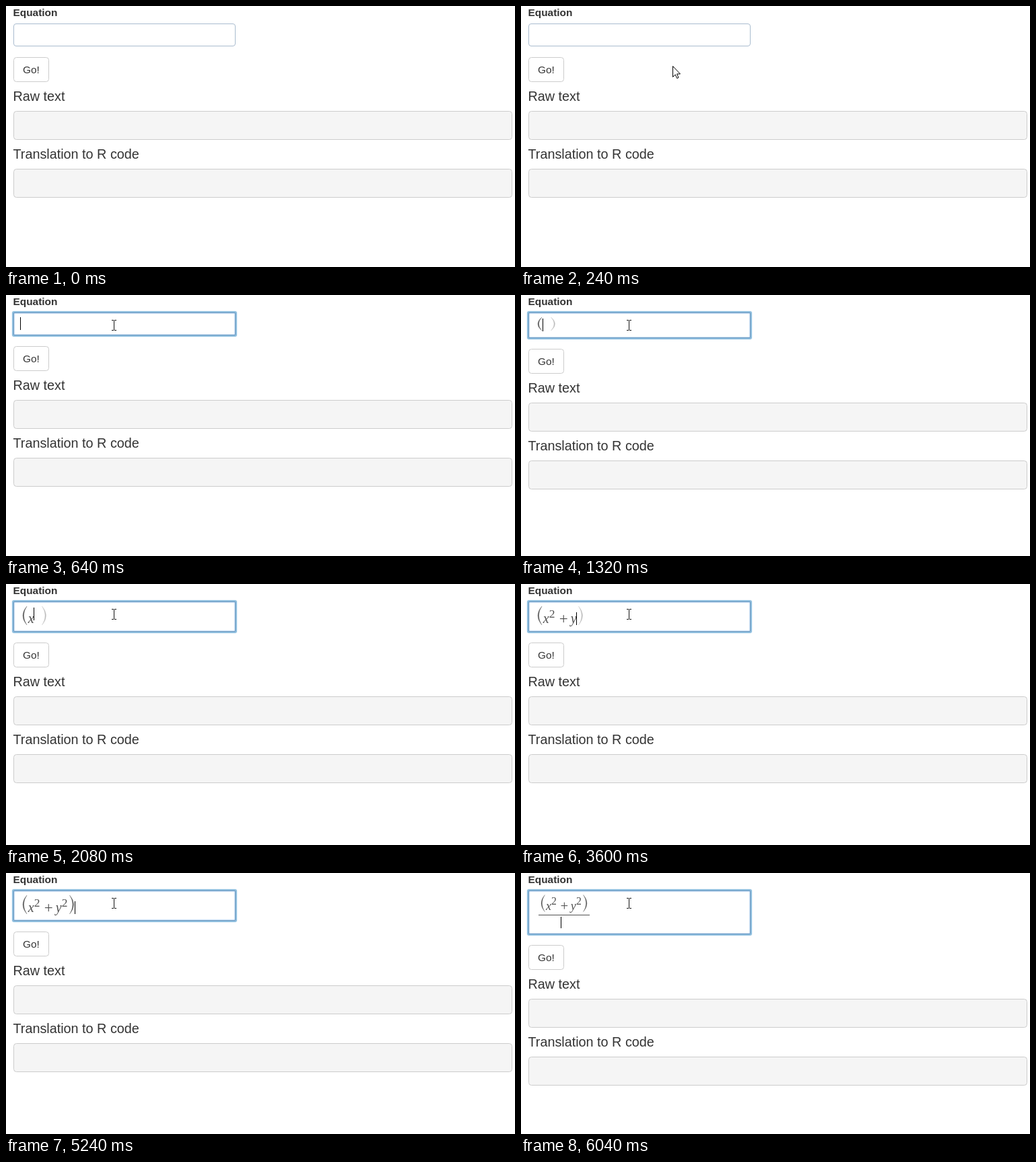
Write an HTML page that moves like this. It is 756x388 px and loops after 8000 ms.

```html
<!DOCTYPE html>
<html lang="en">
<head>
<meta charset="utf-8">
<title>Equation input</title>
<style>
html, body { margin: 0; width: 100%; height: 100%; overflow: hidden; background: #fff; }
#field { position: absolute; left: 11px; top: 26px; width: 330px; box-sizing: border-box; border: 1px solid; background: #fff; }
svg { position: absolute; left: 0; top: 0; }
.ui { font-family: "Liberation Sans", Arial, sans-serif; fill: #333; }
.math { font-family: "Liberation Serif", Times, serif; fill: #505050; }
</style>
</head>
<body>
<div id="field"></div>
<svg id="stage" width="756" height="388" viewBox="0 0 756 388"></svg>
<script>
const LOOP = 8000, STEP = 40;
const MOVE = 320, FOCUS = 370, FADE = 150;
const INK = '#505050', GHOST = '#bdbdbd';
const SLOT = 9, SHRINK = .9;
const field = document.getElementById('field');
const stage = document.getElementById('stage');

// Keystrokes: ^ opens a superscript, > leaves it, / starts a fraction
const keys = [
  ['(', 1320], ['x', 1680], ['^', 2080], ['2', 2240], ['>', 2680], ['+', 3120],
  ['y', 3600], ['^', 3880], ['2', 4120], ['>', 4480], [')', 5240], ['/', 6040]
];

const clamp = v => Math.max(0, Math.min(1, v));
const snap = t => Math.floor(t / STEP) * STEP;
const mix = (a, b, p) => 'rgb(' + a.map((v, i) => Math.round(v + (b[i] - v) * p)) + ')';

const box = (y, w, h, fill) =>
  `<rect x="11.5" y="${y + .5}" width="${w}" height="${h}" rx="4" fill="${fill}" stroke="#ccc"/>`;

const label = (x, y, size, text, weight = 400) =>
  `<text class="ui" x="${x}" y="${y}" font-size="${size}" font-weight="${weight}">${text}</text>`;

const bar = (x, y, w, h, fill) =>
  `<rect x="${x}" y="${y}" width="${w}" height="${h}" fill="${fill}"/>`;

const output = (y, title) => label(10.5, y, 19.8, title) + box(y + 15, 740, 42, '#f5f5f5');

const page = dy => label(10.5, 15, 15.4, 'Equation', 700) +
  box(76 + dy, 52, 36, '#fff') + label(25, 100 + dy, 15.4, 'Go!') +
  output(141 + dy, 'Raw text') + output(227 + dy, 'Translation to R code');

// Crescent from its tips at x, bulging towards side
function bracket(x, bottom, side, fill) {
  const top = 33, mid = (top + bottom) / 2;
  return `<path d="M${x} ${top}Q${x + side * 12} ${mid} ${x} ${bottom}Q${x + side * 9} ${mid} ${x} ${top}" fill="${fill}" stroke="${fill}" stroke-width=".3"/>`;
}

function glyph({ char, x, raised }, drop) {
  const size = raised ? 17.5 : char === '+' ? 23 : 20;
  const y = drop + (raised ? -8.5 : char === '+' ? 1.3 : 0);
  const style = /[a-z]/.test(char) ? 'italic' : 'normal';
  return `<text class="math" x="${x}" y="${y}" font-size="${size}" font-style="${style}">${char}</text>`;
}

// Replays the keystrokes up to t and returns what they leave on the line
function typeset(t) {
  const line = { marks: [], pen: 32, raised: false, tall: false, closed: false, over: false, last: '' };
  for (const [char, time] of keys) {
    if (time > t) break;
    line.last = char;
    if (char === '^') line.raised = line.tall = true;
    else if (char === '>') line.raised = false;
    else if (char === ')') line.closed = true;
    else if (char === '/') line.over = true;
    else if (char !== '(') {
      const wide = char === '+';
      line.marks.push({ char, x: line.pen + (wide ? 6.7 : .7), raised: line.raised });
      line.pen += wide ? 23 : SLOT;
    }
  }
  const empty = line.last === '(' || line.last === '^';
  line.close = line.pen + (empty ? SLOT : 0) + 3;
  return line;
}

const fieldHeight = line => line.over ? 65 : line.tall ? 45 : line.last ? 38 : 34;

function formula(line) {
  if (!line.last) return '';
  const bottom = line.tall ? 61 : 53;
  const drop = bottom - (line.tall ? 3 : 0);
  const body = bracket(31, bottom, -1, INK) +
    line.marks.map(m => glyph(m, drop)).join('') +
    bracket(line.close + .5, bottom, 1, line.closed ? INK : GHOST);
  if (!line.over) return body;
  return `<g transform="translate(30 32.5) scale(${SHRINK}) translate(-25 -33)">${body}</g>` +
    bar(26, 62, 76, 1, INK);
}

function caret(t, line) {
  if (t < FOCUS + STEP) return '';
  if (line.over) return bar(59, 65, 1, 19 * SHRINK, '#000');
  const x = !line.last ? 21 : line.closed ? line.close + 8 : line.pen;
  const y = !line.last ? 33 : line.tall && !line.raised ? 42 : 35;
  return bar(x, y, 1, 19, '#000');
}

function pointer(t) {
  if (t < STEP) return '';
  const left = (1 - clamp((snap(t) - STEP) / MOVE)) ** 2;
  const x = Math.round(160 + 463 * left), y = Math.round(45 + 311 * left);
  const shape = y < 60
    ? '<path d="M-3 -7.5H0M1 -7.5H4M.5 -7V7M-3 7.5H0M1 7.5H4" fill="none" stroke="#111"/>'
    : '<path d="M.5 .5V16.5L4.2 13L6.7 18.5L9 17.5L6.6 12H11.5Z" fill="#fff" stroke="#000"/>';
  return `<g transform="translate(${x} ${y})">${shape}</g>`;
}

function drawField(t, height) {
  const raw = clamp((snap(t) - FOCUS) / FADE);
  const p = raw * raw * (3 - 2 * raw);
  const spread = raw > 0 ? 2 : 0;
  Object.assign(field.style, {
    height: height + 'px',
    borderRadius: 4 - 3 * p + 'px',
    borderColor: mix([169, 188, 207], [112, 154, 192], p),
    boxShadow: `0 0 1px ${spread}px rgba(136,187,221,${p}), inset 0 0 2px rgba(102,170,238,${p})`
  });
}

function draw(t) {
  const line = typeset(t), height = fieldHeight(line);
  drawField(t, height);
  stage.innerHTML = page(height - 34) + formula(line) + caret(t, line) + pointer(t);
}

const start = performance.now();
function tick() {
  draw((performance.now() - start) % LOOP);
  requestAnimationFrame(tick);
}
draw(0);
requestAnimationFrame(tick);
</script>
</body>
</html>
```
